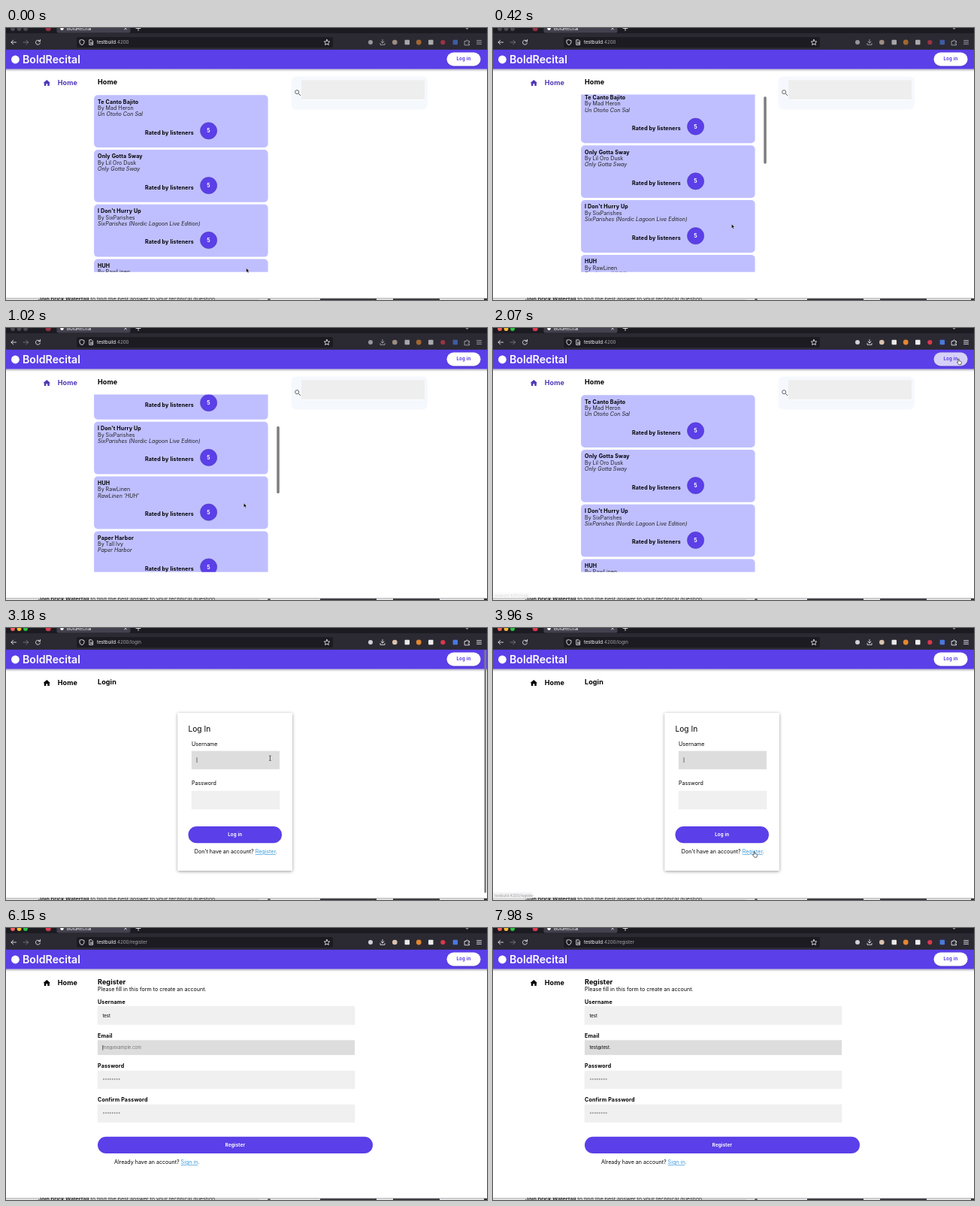
Recreate the animation shown at these times as an HTML page. Size 640 by 362 pixels, loop 8 s.

```html
<!DOCTYPE html>
<html lang="en">
<head>
<meta charset="utf-8">
<title>Song ratings</title>
<style>
  html, body { margin: 0; width: 100%; height: 100%; overflow: hidden; background: #fff; }
  svg { display: block; width: 100vw; height: 100vh; }
  text { font: 7.1px Inter, sans-serif; white-space: pre; }
  .b { font-weight: 700; letter-spacing: .16px; }
  .i { font-style: italic; }
  .h { font-size: 9px; font-weight: 700; letter-spacing: .1px; }
  .btn { font-size: 6.1px; font-weight: 700; letter-spacing: .2px; text-anchor: middle; }
  .field { font-size: 5.9px; }
  .url { font-size: 6.2px; }
  .link { fill: #3a9bdc; text-decoration: underline; }
  .line { fill: none; stroke: #fbfbfe; stroke-width: .8; stroke-linecap: round; stroke-linejoin: round; }
</style>
</head>
<body>
<svg id="stage" viewBox="0 0 640 362" preserveAspectRatio="none"></svg>
<script>
const LOOP = 8000, PURPLE = '#5b3fe8', NAV = '#5038b8', GREY = '#f0f0f0', FOCUS = '#dddddd';
const LOGIN_AT = 2400, REGISTER_AT = 4150, ACTIVE_AT = 1920;
const PITCH = 72.8, VIEW = 235, CONTENT = 620;

const rect = (x, y, x2, y2, fill, r = 0, more = '') =>
  `<rect x="${x}" y="${y}" width="${x2 - x}" height="${y2 - y}" rx="${r}" fill="${fill}" ${more}/>`;
const dot = (x, y, r, fill, more = '') => `<circle cx="${x}" cy="${y}" r="${r}" fill="${fill}" ${more}/>`;
const text = (x, y, s, cls = '', fill = '#000', more = '') =>
  `<text x="${x}" y="${y}" class="${cls}" fill="${fill}" ${more}>${s}</text>`;
const line = (d, more = '') => `<path class="line" d="${d}" ${more}/>`;
const group = (id, body, more = '') => `<g id="${id}" ${more}>${body}</g>`;

const songs = [
  ['Te Canto Bajito', 'Mad Heron', 'Un Otoño Con Sal'],
  ['Only Gotta Sway', 'Lil Oro Dusk', 'Only Gotta Sway'],
  ["I Don't Hurry Up", 'SixParishes', 'SixParishes (Nordic Lagoon Live Edition)'],
  ['HUH', 'RawLinen', "RawLinen 'HUH'"],
  ['Paper Harbor', 'Tall Ivy', 'Paper Harbor']
];

const card = ([title, artist, album], n) => `<g transform="translate(0 ${n * PITCH})">` +
  rect(117.1, 89.2, 348.6, 159, '#bfbfff', 5) +
  text(122, 100.5, title, 'b') + text(122, 109, 'By ' + artist, '', '#222') +
  text(122, 117.3, album, 'i', '#222') + text(185, 141.8, 'Rated by listeners', 'b') +
  dot(269.6, 136.8, 11.1, PURPLE, 'stroke="#4f3fb5" stroke-width=".6"') +
  text(269.6, 139.4, '5', 'b', '#fff', 'text-anchor="middle"') + '</g>';

const input = (id, x, y, x2, y2) =>
  rect(x, y, x2, y2, GREY, .5, `id="${id}" stroke="#e8e8e8" stroke-width=".4"`);

const button = (x, y, x2, y2, label) =>
  rect(x, y, x2, y2, PURPLE, (y2 - y) / 2) + text((x + x2) / 2, (y + y2) / 2 + 2.1, label, 'btn', '#fff');

const prompt = (x, y, ask, link) => text(x, y, `${ask} <tspan class="link">${link}</tspan>.`);

const chrome =
  rect(0, 0, 640, 8, '#1c1b22') + rect(0, 7, 640, 29, '#2b2a33') +
  rect(67.5, -4, 165.5, 6.5, '#42414d', 2) +
  ['#ff5f57', '#febc2e', '#28c840'].map((c, n) => dot(9 + n * 8.5, 1, 2.9, c, `class="light" data-on="${c}"`)).join('') +
  dot(56.2, .8, 3.5, '#d8394c', 'class="tool"') + dot(74.5, .8, 2.2, '#fff') +
  text(81, 2.8, 'BoldRecital', 'url', '#fbfbfe') +
  line('M157.5-1l3 3m0-3l-3 3M173 0.5h6m-3-3v6M611.5-.5l2 2 2-2') +
  rect(94, 12, 435, 26, '#1c1b22', 2) +
  line('M13.5 19h-6.5m2.7-2.8L7 19l2.7 2.8') +
  line('M23 19h6.5m-2.7-2.8L29.5 19l-2.7 2.8', 'opacity=".4"') +
  line('M45 17.5a3 3 0 1 0 .4 2.5M45.5 15.5v2.3h-2.3') +
  line('M101 15.7l3 1v2.5q-.3 2.5-3 3.5q-2.7-1-3-3.5v-2.5z') +
  line('M111.2 15.8h2.8l1.6 1.6v5h-4.4zM112.5 19h2m-2 1.6h2') +
  text(121, 20.9, 'testbuild<tspan fill="#a5a4ad">:4200<tspan id="path"></tspan></tspan>', 'url', '#fbfbfe') +
  line('M427 15.4l1.1 2.4 2.6.3-1.9 1.8.5 2.6-2.3-1.3-2.3 1.3.5-2.6-1.9-1.8 2.6-.3z') +
  group('tools',
    dot(485, 19, 3, '#d0d0d6') +
    line('M501 15.5v4.5m-2-2l2 2 2-2M498 20.5v1.8h6v-1.8') +
    dot(517.3, 19, 3.3, '#d9c2ad') + rect(530.5, 15.8, 537, 22.2, '#e8e8e8', 1) +
    dot(549.2, 19, 3.4, '#e2872f') + rect(562, 15.8, 568.5, 22.2, '#eeeeee', 1) +
    dot(581.3, 19, 3.1, '#d8394c') + rect(594.6, 15.8, 601, 22.2, '#4a78dd', 1) +
    line('M610.5 17.5h2v-1q1-1.3 2 0v1h2v2h-1q-1.2.8 0 1.8h1v1.5h-6z') +
    line('M626.5 16.7h6m-6 2.3h6m-6 2.3h6'));

const header = rect(0, 54.5, 640, 58, 'url(#shade)') + rect(0, 28.8, 640, 54.6, PURPLE) +
  dot(12.4, 42, 5.4, '#fff') +
  text(22, 46.6, 'BoldRecital', '', '#fff', 'style="font-size:14.2px;font-weight:600"') +
  rect(586.5, 32.5, 631.5, 50.5, '#fff', 9, 'id="loginBtn" filter="url(#lift)"') +
  text(609, 43.2, 'Log in', 'btn', PURPLE);

const nav = group('nav', '<path d="M54.3 69l4.8 4.2h-1.3v3.8h-2.5v-2.7h-2v2.7h-2.5v-3.8h-1.3z"/>' +
  '<text x="68.7" y="76.4" class="h">Home</text>');

const home = text(122, 75, 'Home', 'h') +
  `<g clip-path="url(#listClip)">${group('list', songs.map(card).join(''))}</g>` +
  rect(360.3, 89, 363.8, 178.5, '#7d7d7d', 1.7, 'id="thumb"') +
  rect(379.5, 64.5, 561, 108.5, '#f5f8fc', 7) + rect(393, 69.5, 557, 95, '#eeeeee', .5) +
  rect(393, 95, 557, 95.8, '#fff') +
  '<path d="M389.4 87.4l2.6 2.6" stroke="#555" stroke-width="1"/>' +
  dot(387.2, 85.2, 2.5, 'none', 'stroke="#555" stroke-width=".9"');

const login = text(122, 75, 'Login', 'h') +
  rect(228.5, 113, 381, 323, '#fff', 1, 'filter="url(#drop)"') +
  text(242.5, 138.3, 'Log In', '', '#000', 'style="font-size:10.2px"') +
  text(247, 156.5, 'Username') + input('loginName', 247, 163.7, 364, 188) +
  text(247, 209.3, 'Password') + input('loginPass', 247, 217, 364, 241) +
  button(242.5, 264, 367, 286.3, 'Log in') +
  prompt(250.8, 300.2, "Don't have an account?", 'Register') +
  rect(636.4, 29, 639, 352.5, '#7d7d7d', 1.3, 'id="pageThumb"');

const row = (label, id, y, y2, mid, hint) =>
  text(122, y - 3.8, label, 'b') + input(id, 122, y, 464, y2) +
  text(128.5, mid, hint, 'field', '#757575', `id="${id}Text"`);

const register = text(122, 75, 'Register', 'h') +
  text(122, 83.8, 'Please fill in this form to create an account.') +
  row('Username', 'name', 104.3, 128.5, 118.8, 'user123') +
  row('Email', 'mail', 149.3, 169, 161.4, 'me@example.com') +
  row('Password', 'pass', 190.2, 213.7, 204.6, '********') +
  row('Confirm Password', 'again', 235, 258.5, 249.6, '********') +
  button(122, 277.8, 488, 300, 'Register') +
  prompt(144, 314, 'Already have an account?', 'Sign in');

const desktop = rect(0, 359.6, 640, 362, '#e6e6e6') + rect(0, 359.4, 640, 360.3, '#a5a5a5') +
  rect(418, 360.2, 493, 362, '#33333a') + rect(515, 360.2, 577, 362, '#33333a') + rect(636, 360, 640, 362, '#33333a') +
  rect(277, 360.3, 337, 362, '#cfcfcf') + dot(350, 362, 2, '#555') +
  '<g clip-path="url(#edge)">' +
  text(43, 362.6, '<tspan font-weight="700">Join Brick Waterfall</tspan> to find the best answer to your technical question', '', '#333') + '</g>';

const cursors =
  group('arrow', '<path d="M0 0v5.6l1.3-1.1.9 2 1-.4-.9-2h1.8z" fill="#000" stroke="#fff" stroke-width=".4"/>') +
  group('hand', '<path d="M1 0q.8-.3 1 .5v1.9l2.2.6q.7.3.6 1.1l-.5 2.6H1.7L-.2 4.2q-.2-.8.6-.7l.5.4z" fill="#fff" stroke="#000" stroke-width=".5"/>', 'transform="scale(1.15)"') +
  group('beam', '<path d="M-1.3-3.3q1.3 0 1.3.8 0-.8 1.3-.8M0-2.5v5M-1.3 3.3q1.3 0 1.3-.8 0 .8 1.3.8" fill="none" stroke="#222" stroke-width=".7"/>');

document.getElementById('stage').innerHTML = `<defs>
  <linearGradient id="shade" x2="0" y2="1"><stop stop-color="#b4b4bc"/><stop offset="1" stop-color="#fff"/></linearGradient>
  <filter id="drop" x="-10%" y="-10%" width="120%" height="120%"><feDropShadow dx="0" dy="1" stdDeviation="2" flood-opacity=".4"/></filter>
  <filter id="lift" x="-10%" y="-20%" width="120%" height="150%"><feDropShadow dx="0" dy=".6" stdDeviation=".7" flood-opacity=".35"/></filter>
  <clipPath id="listClip"><rect x="110" y="88.6" width="245" height="236.2"/></clipPath>
  <clipPath id="edge"><rect y="358.8" width="640" height="4"/></clipPath></defs>` +
  rect(0, 0, 640, 362, '#fff') + chrome + header + nav +
  group('home', home) + group('login', login) + group('register', register) + desktop +
  group('status', rect(0, 352, 52, 360, '#ededf0', 1) +
    text(2, 358, 'testbuild:4200<tspan id="target"></tspan>', '', '#777', 'style="font-size:4.8px"')) +
  rect(0, 0, .6, 7, '#222', 0, 'id="caret"') + group('cursor', cursors);

const $ = id => document.getElementById(id);
const show = (id, on) => { $(id).style.display = on ? '' : 'none'; };
const set = (id, name, value) => $(id).setAttribute(name, value);

// Smooth value between [time, ...values] stops.
function tween(stops, t) {
  let n = stops.findIndex(s => s[0] > t);
  if (n < 0) n = stops.length;
  const a = stops[Math.max(n - 1, 0)], b = stops[Math.min(n, stops.length - 1)];
  const u = b[0] > a[0] ? (t - a[0]) / (b[0] - a[0]) : 0;
  const e = u * u * (3 - 2 * u);
  return a.slice(1).map((v, k) => v + (b[k + 1] - v) * e);
}

const scroll = [[330, 0], [990, 110], [1100, 110], [1650, 0]];
const path = [[120, 319.7, 319.6], [600, 316.3, 234.2], [1450, 316.3, 232], [1980, 617.8, 41],
  [2480, 617.8, 41], [2900, 351.4, 173.2], [3400, 351.4, 173.2], [3880, 346, 297.5],
  [4230, 346, 297.5], [4600, 265.6, 122]];
const statusFade = [[1980, 0], [2250, 1], [LOGIN_AT, 1], [3800, 0], [4050, 1]];

const focuses = [[2950, 'loginName', 253.7, 172.2], [REGISTER_AT], [4900, 'name', 128.5, 113], [5850, 'mail', 128.5, 155.8]];
const typed = {
  name: ['test', [5190, 5310, 5430, 5550], 'user123'],
  mail: ['test@test.', [6240, 6350, 6460, 6570, 6870, 7020, 7120, 7220, 7320, 7430], 'me@example.com']
};

function drawCaret(t) {
  const focus = focuses.filter(f => f[0] <= t).pop() || [];
  const [since, id, x, y] = focus;
  for (const f of ['loginName', 'name', 'mail']) set(f, 'fill', f === id ? FOCUS : GREY);
  let last = since, width = 0;
  for (const f in typed) {
    const [word, keys, hint] = typed[f];
    const count = keys.filter(k => k <= t).length, label = $(f + 'Text');
    label.textContent = count ? word.slice(0, count) : hint;
    label.setAttribute('fill', count ? '#000' : '#757575');
    if (f === id && count) {
      last = keys[count - 1];
      width = label.getComputedTextLength();
    }
  }
  show('caret', id && (t - last) % 1000 < 500);
  if (id) set('caret', 'transform', `translate(${x + width} ${y})`);
}

function drawCursor(t, page) {
  const [x, y] = tween(path, t);
  const within = (l, top, r, b) => x > l && x < r && y > top && y < b;
  const onLogin = t >= ACTIVE_AT && within(586, 32, 631, 50);
  const onLink = page === 'login' && within(331, 293, 360, 302);
  const onInput = page === 'login' && (within(247, 164, 364, 188) || within(247, 217, 364, 241)) ||
    page === 'register' && within(122, 104, 464, 128);
  const kind = onLogin || onLink ? 'hand' : onInput ? 'beam' : 'arrow';
  for (const k of ['arrow', 'hand', 'beam']) show(k, k === kind);
  show('cursor', t < 5190);
  set('cursor', 'transform', `translate(${x} ${y})`);
  set('loginBtn', 'fill', onLogin ? '#d6d0f8' : '#fff');
  show('status', onLogin || onLink);
  set('status', 'opacity', tween(statusFade, t)[0]);
  $('target').textContent = onLink ? '/register' : '/login';
}

function draw(t) {
  const page = t < LOGIN_AT ? 'home' : t < REGISTER_AT ? 'login' : 'register';
  for (const p of ['home', 'login', 'register']) show(p, p === page);
  $('path').textContent = page === 'home' ? '' : '/' + page;
  set('nav', 'fill', page === 'home' ? NAV : '#000');

  const active = t >= ACTIVE_AT;
  for (const l of document.querySelectorAll('.light')) l.setAttribute('fill', active ? l.dataset.on : '#4a4952');
  for (const e of [$('tools'), document.querySelector('.tool')]) e.setAttribute('opacity', active ? 1 : .65);

  const [top] = tween(scroll, t);
  set('list', 'transform', `translate(0 ${-top})`);
  set('thumb', 'transform', `translate(0 ${top * VIEW / CONTENT})`);
  set('thumb', 'opacity', tween([[300, 0], [360, 1], [1700, 1], [1900, 0]], t)[0]);
  set('pageThumb', 'opacity', tween([[3300, 1], [3500, 0]], t)[0]);

  drawCursor(t, page);
  drawCaret(t);
}

const start = performance.now();
function frame(now) {
  draw(Math.max(0, now - start) % LOOP);
  requestAnimationFrame(frame);
}
draw(0);
requestAnimationFrame(frame);
</script>
</body>
</html>
```
